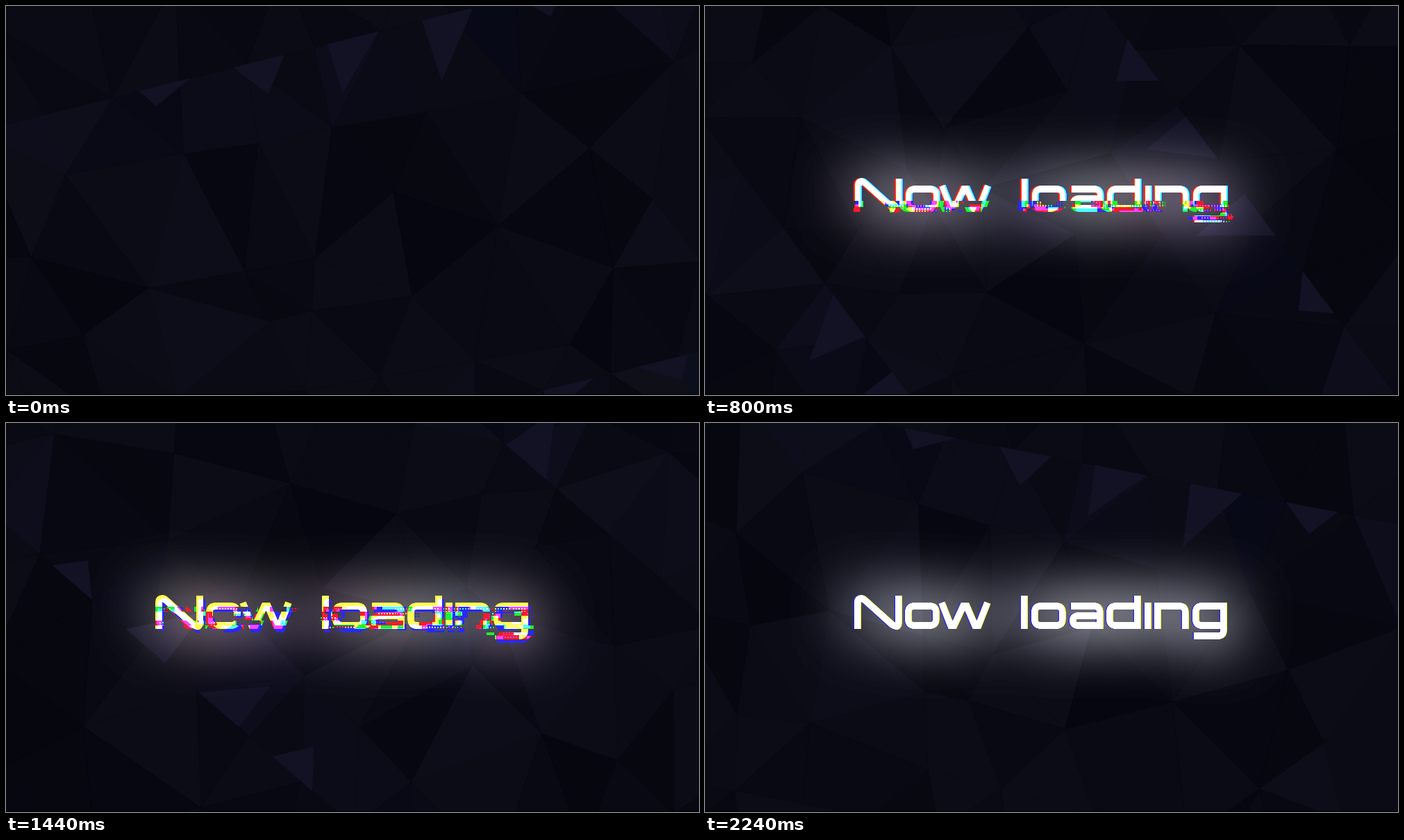
Recreate the animation shown at these times as an HTML page with a canvas. Size 998 px wide and 561 px high, loop 2.32 s.

```html
<!DOCTYPE html>
<html lang="en">
<head>
<meta charset="utf-8">
<title>Now loading</title>
<style>
  html, body { margin: 0; width: 100%; height: 100%; overflow: hidden; background: #080812; }
  canvas { display: block; width: 998px; height: 561px; font-family: Inter, sans-serif; }
</style>
</head>
<body>
<canvas id="stage" width="998" height="561" role="img" aria-label="Now loading">Now loading</canvas>
<script>
const W = 998, H = 561, LOOP = 2320, STEP = 80;
const LEFT = 205, RIGHT = 785, BOTTOM = 313;   // reach of the glitch
const RIDGES = [-227, 333];                    // two parallel creases in the backdrop
const TILT = -14;

const ctx = document.getElementById('stage').getContext('2d');
const clamp = (x, lo = 0, hi = 1) => Math.min(hi, Math.max(lo, x));

function random(seed) {
  return () => {
    seed = seed + 0x6D2B79F5 | 0;
    let t = Math.imul(seed ^ seed >>> 15, 1 | seed);
    t = t + Math.imul(t ^ t >>> 7, 61 | t) ^ t;
    return ((t ^ t >>> 14) >>> 0) / 4294967296;
  };
}

function layer() {
  const c = document.createElement('canvas');
  c.width = W;
  c.height = H;
  return c.getContext('2d');
}

// Backdrop: main nodes around the centre, with x along the creases.
const nodes = [
  [-393, -136], [-220, -124], [-112, -113], [-3, -109], [134, -98], [273, -90], [498, -82],
  [-469, -32], [60, 3], [349, 10], [-316, 52], [-176, 62], [-73, 69], [194, 87], [420, 103],
  [-423, 95], [-158, 141], [-95, 141], [50, 155], [341, 186], [-417, 226], [-133, 250],
  [-24, 257], [115, 268], [253, 278]
];

function meshPoints(rnd) {
  const points = [...nodes];
  for (const y of RIDGES) for (let x = -700; x <= 700; x += 100) points.push([x, y]);
  for (let y = -640; y <= 640; y += 60) {
    for (let x = -640; x <= 640; x += 80) {
      const p = [x + rnd() * 70, y + rnd() * 50];
      if (points.every(q => Math.hypot(p[0] - q[0], p[1] - q[1]) > 105)) points.push(p);
    }
  }
  return points;
}

// Keeps each triangle whose circumcircle holds no other point.
function triangulate(points) {
  const out = [], n = points.length;
  for (let i = 0; i < n; i++) for (let j = i + 1; j < n; j++) for (let k = j + 1; k < n; k++) {
    const [ax, ay] = points[i];
    const bx = points[j][0] - ax, by = points[j][1] - ay;
    const cx = points[k][0] - ax, cy = points[k][1] - ay;
    const d = 2 * (bx * cy - by * cx);
    if (Math.abs(d) < 1) continue;
    const b = bx * bx + by * by, c = cx * cx + cy * cy;
    const ux = (cy * b - by * c) / d, uy = (bx * c - cx * b) / d, r = Math.hypot(ux, uy);
    if (r > 400) continue;
    if (points.every(([x, y]) => Math.hypot(x - ax - ux, y - ay - uy) > r - .01)) {
      out.push([points[i], points[j], points[k]]);
    }
  }
  return out;
}

function facet(points, light, blue) {
  return { points, color: `rgb(${5 + 10 * light},${6 + 9 * light},${14 + 13 * light + 6 * blue})` };
}

function buildMesh() {
  const rnd = random(11);
  const mesh = triangulate(meshPoints(rnd)).map(tri => {
    const y = (tri[0][1] + tri[1][1] + tri[2][1]) / 3;
    const below = Math.min(...RIDGES.map(r => y > r ? y - r : 999));
    const blue = clamp(1 - below / 130);
    return facet(tri, clamp(rnd() * .75 + blue * .35), blue * rnd());
  });
  // Bright shards hang from the creases.
  RIDGES.forEach((y, i) => {
    for (let k = 0; k < 5; k++) {
      const x = -260 + 180 * i + 140 * k, depth = 20 + 75 * rnd();
      mesh.push(facet([[x, y], [x + 75, y], [x + 75 * rnd(), y + depth]], 1.35, .7));
    }
  });
  return mesh;
}
const mesh = buildMesh();

// Step and angle the backdrop swings through.
const swing = [[0, 0], [6, 128.5], [10, 67], [13, -60.3], [18, -125], [22, -108], [28, 25]];

function angleAt(s) {
  const last = swing.length - 1;
  const slope = (a, b) => (swing[b][1] - swing[a][1]) / (swing[b][0] - swing[a][0]);
  const tangent = i => slope(Math.max(0, i - 1), Math.min(last, i + 1));
  let i = 0;
  while (i < last - 1 && s >= swing[i + 1][0]) i++;
  const [x0, y0] = swing[i], [x1, y1] = swing[i + 1];
  const d = x1 - x0, u = (s - x0) / d, v = 1 - u;
  return v * v * (1 + 2 * u) * y0 + u * u * (3 - 2 * u) * y1 +
    u * v * d * (v * tangent(i) - u * tangent(i + 1));
}

function drawBackdrop(step) {
  ctx.fillStyle = '#0a0a15';
  ctx.fillRect(0, 0, W, H);
  ctx.save();
  ctx.translate(499, 280);
  ctx.rotate((angleAt(step) + TILT) * Math.PI / 180);
  ctx.lineWidth = .6;
  for (const { points, color } of mesh) {
    ctx.fillStyle = ctx.strokeStyle = color;
    ctx.beginPath();
    points.forEach(([x, y]) => ctx.lineTo(x, y));
    ctx.closePath();
    ctx.fill();
    ctx.stroke();
  }
  ctx.restore();
}

// Title: one stroked outline per letter.
const bowl = x => `M${x + 14} 264h22q9 0 9 9v10q0 9-9 9h-22q-9 0-9-9v-10q0-9 9-9z`;
const hook = x => `M${x} 292h-31q-9 0-9-9v-10q0-9 9-9h31`;
const lettering = new Path2D([
  'M220 297V258Q220 253 225 253Q228 253 231 256L270 291Q279 297 279 288V249',
  bowl(288),
  'M341 259L354 292H359L372 264H377L389 292H394L407 259',
  'M460 249V297',
  bowl(470),
  'M527 264h33q9 0 9 9v24M569 292h-31q-8 0-8-7t8-7h31',
  hook(623) + 'M623 249V297',
  'M638 259V297',
  'M652 297V264h31q9 0 9 9v24',
  hook(747) + 'M747 259V299q0 8-8 8h-35'
].join(''));

const inks = ['#f21c2c', '#20f02c', '#2c28f4'];
const clean = inks.map(color => {
  const g = layer();
  g.strokeStyle = color;
  g.lineWidth = 9.8;
  g.stroke(lettering);
  return g.canvas;
});
const channel = layer(), mix = layer();
mix.globalCompositeOperation = 'lighter';

// An opening burst that dies away, then a second, softer one.
function glitchAt(step) {
  const early = clamp((14 - step) / 10);
  const late = Math.exp(-(((step - 18) / 3) ** 2));
  const level = early + .6 * late;
  return {
    early, late,
    left: RIGHT - (RIGHT - LEFT) * Math.min(1, 2.5 * level),
    top: 281 - 80 * clamp(level - .4, 0, .4),
    density: level < .02 ? 0 : .45 + .45 * early,
    lost: .3 + .65 * clamp((8 - step) / 6) ** 1.5,
    odd: clamp(Math.floor((step - 9) / 4), 0, 2)
  };
}

function scramble(c, look, rnd) {
  const g = channel;
  for (let y = look.top, h; y < BOTTOM; y += h) {
    h = Math.min(BOTTOM - y, 3 + Math.floor(rnd() * 7));
    const rowShift = (rnd() - .5) * 24;
    for (let x = look.left, w; x < RIGHT; x += w) {
      w = Math.min(RIGHT - x, 10 + Math.floor(rnd() * 30));
      const tilt = .3 * look.early * (.5 - (x - LEFT) / (RIGHT - LEFT));
      const hit = rnd() < look.density;
      const drop = rnd() < look.lost + tilt + .15 * c * look.early;
      const dotted = rnd() < .4;
      if (!hit) continue;
      g.clearRect(x, y, w, h);
      if (drop) continue;
      g.drawImage(clean[c], Math.round(x - rowShift), y, w, h, x, y, w, h);
      if (!dotted) continue;
      for (let i = 0; i < w; i += 4) g.clearRect(x + i, y, 1.5, h);
      for (let j = 0; j < h; j += 4) g.clearRect(x, y + j, w, 1.5);
    }
  }
}

function drawTitle(step) {
  if (step < 2) return;
  const look = glitchAt(step);
  mix.clearRect(0, 0, W, H);
  inks.forEach((ink, c) => {
    const own = c === look.odd ? 1 : 0;
    const dx = own * (4.5 * look.late - 1.5) + 2 * c * look.early;
    channel.clearRect(0, 0, W, H);
    channel.drawImage(clean[c], dx, own * 5 * look.late);
    scramble(c, look, random(step * 97 + c * 13));
    mix.drawImage(channel.canvas, 0, 0);
  });
  ctx.save();
  ctx.globalCompositeOperation = 'lighter';
  ctx.globalAlpha = .85;
  ctx.filter = 'blur(43px)';
  for (let i = 0; i < 2; i++) ctx.drawImage(mix.canvas, 0, 0);
  ctx.restore();
  ctx.drawImage(mix.canvas, 0, 0);
}

let shown = -1;
function tick() {
  const step = Math.floor(performance.now() % LOOP / STEP);
  if (step !== shown) {
    shown = step;
    drawBackdrop(step);
    drawTitle(step);
    ctx.fillStyle = '#000';
    ctx.fillRect(0, H - 1, W, 1);
  }
  requestAnimationFrame(tick);
}
tick();
</script>
</body>
</html>
```
